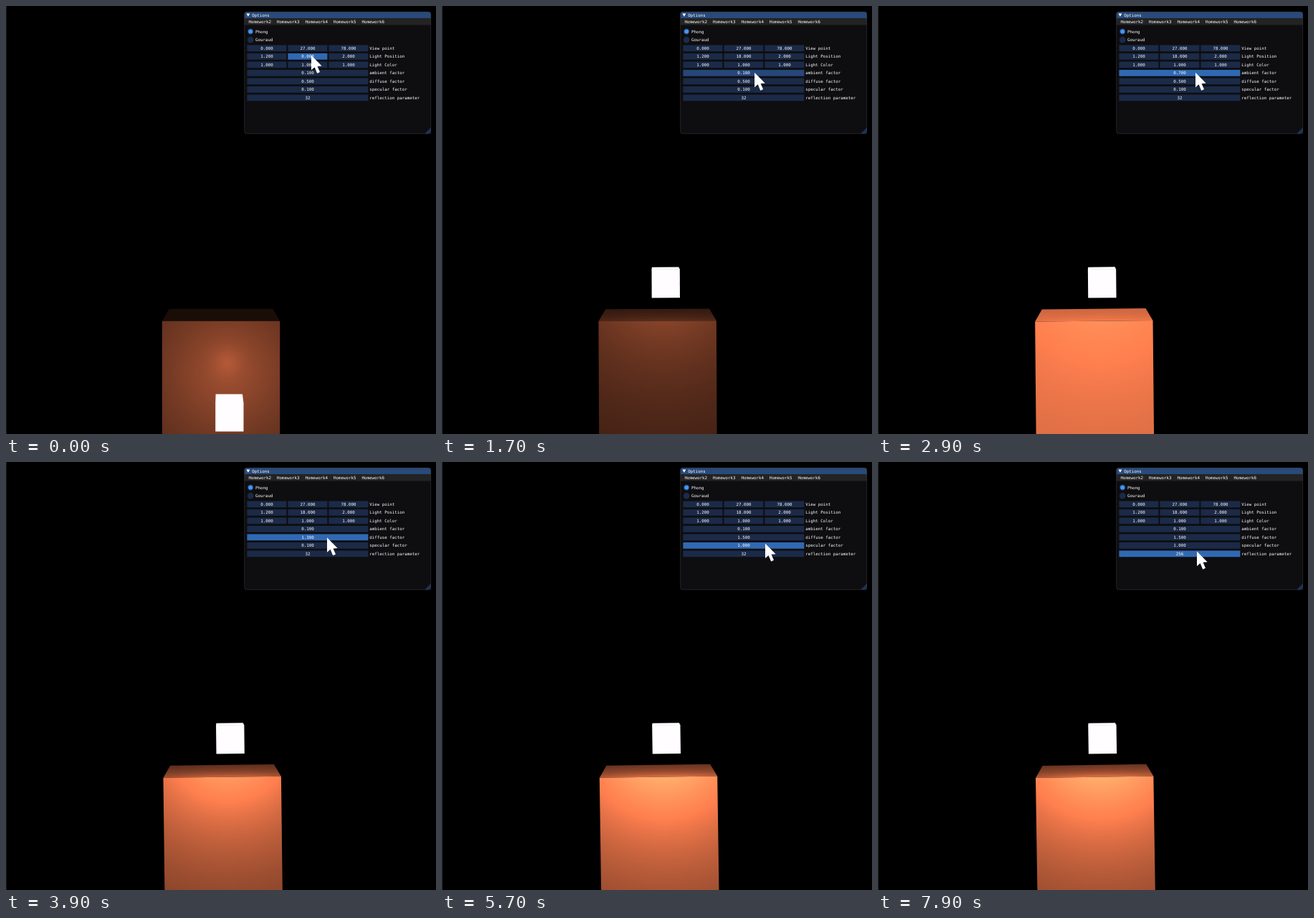
These frames come from a looping animation (600x596 px, 8000 ms). An HTML page with a canvas:

```html
<!DOCTYPE html>
<html lang="en">
<head>
<meta charset="utf-8">
<title>Lighting options</title>
<style>
html, body { margin: 0; width: 100%; height: 100%; overflow: hidden; background: #000; }
canvas { display: block; width: 600px; height: 596px; }
</style>
</head>
<body>
<canvas id="stage" width="600" height="596"></canvas>
<script>
const ctx = document.getElementById('stage').getContext('2d');
const LOOP = 8000, STEP = 100;
const EYE = { x: 300, y: 298, z: 1200 };
const CUBE = { left: 217.8, right: 382.2, top: 438.7, bottom: 606 };
const CORAL = [255, 127, 79];
const LAMP = '#fffdff', IDLE = '#1b2a47', HOVER = '#25477a', ACTIVE = '#3069b3';

const ramp = (t, from, to) => Math.min(1, Math.max(0, (t - from) / (to - from)));

// Everything that changes, as a function of time.
function stateAt(t) {
  const r = (from, to) => ramp(t, from, to);
  return {
    height: Math.round(18 * r(0, 900)),
    ambient: .1 - .1 * r(1900, 2200) + .7 * r(2200, 2600) - .6 * r(3000, 3300),
    diffuse: .5 + .8 * r(3500, 3900) + .2 * r(4000, 4500),
    specular: .1 + .9 * r(4900, 5500),
    shine: Math.round(32 + 224 * r(7100, 7800)),
    roll: .016 * (1 - Math.exp(-Math.max(0, t - 1000) / 2100)),
    cursor: {
      x: 426 + 8 * r(0, 900) + 17 * r(900, 1000) - 17 * r(1000, 1800) + 9 * r(1900, 2600)
        - 4 * r(3000, 3300) + 9 * r(3500, 3900) + 3 * r(4900, 5500)
        - 11 * r(6500, 6900) + 5 * r(7100, 7800),
      y: 68.7 + 15 * r(900, 1000) + 9 * r(1000, 1400) + 12.5 * r(3300, 3600)
        + 8.3 * r(4500, 4900) + 11 * r(6500, 6900)
    }
  };
}

function poly(points, fill) {
  ctx.beginPath();
  points.forEach(([x, y]) => ctx.lineTo(x, y));
  ctx.closePath();
  ctx.fillStyle = fill;
  ctx.fill();
}

function rect(x, y, w, h, fill) {
  ctx.fillStyle = fill;
  ctx.fillRect(x, y, w, h);
}

function disc(x, y, r, fill) {
  ctx.fillStyle = fill;
  ctx.beginPath();
  ctx.arc(x, y, r, 0, 7);
  ctx.fill();
}

function label(text, x, y, align = 'left') {
  ctx.fillStyle = '#fff';
  ctx.textAlign = align;
  ctx.fillText(text, x, y + 2.3);
}

const dot = (a, b) => a.x * b.x + a.y * b.y + a.z * b.z;

function toward(from, to) {
  const v = { x: to.x - from.x, y: to.y - from.y, z: to.z - from.z };
  const len = Math.sqrt(dot(v, v));
  return { x: v.x / len, y: v.y / len, z: v.z / len };
}

// Phong brightness of a surface point.
function phong(point, normal, light, s) {
  const l = toward(point, light);
  const facing = dot(l, normal);
  if (facing <= 0) return s.ambient;
  const v = toward(point, EYE);
  const mirrored = 2 * facing * dot(normal, v) - dot(l, v);
  return s.ambient + s.diffuse * facing + s.specular * Math.max(0, mirrored) ** s.shine;
}

// Surface points behind a screen position.
const frontPoint = (x, y) => ({ x, y, z: 0 });
function lidPoint(x, y) {
  const scale = (y - EYE.y) / (CUBE.top - EYE.y);
  return { x: EYE.x + (x - EYE.x) / scale, y: CUBE.top, z: EYE.z * (1 - 1 / scale) };
}

// Shades a face on a coarse grid and stretches it smoothly over the polygon.
const CELL = 2;
const tile = document.createElement('canvas');
function shadeFace(points, pointAt, normal, light, s) {
  const xs = points.map(p => p[0]), ys = points.map(p => p[1]);
  const x0 = Math.min(...xs) - CELL, y0 = Math.min(...ys) - CELL;
  const w = Math.ceil((Math.max(...xs) - x0) / CELL) + 1;
  const h = Math.ceil((Math.max(...ys) - y0) / CELL) + 1;
  tile.width = w;
  tile.height = h;
  const pen = tile.getContext('2d');
  const image = pen.createImageData(w, h);
  for (let j = 0; j < h; j++) {
    for (let i = 0; i < w; i++) {
      const point = pointAt(x0 + (i + .5) * CELL, y0 + (j + .5) * CELL);
      const glow = phong(point, normal, light, s);
      image.data.set([...CORAL.map(c => c * glow), 255], (j * w + i) * 4);
    }
  }
  pen.putImageData(image, 0, 0);
  ctx.save();
  ctx.beginPath();
  points.forEach(([x, y]) => ctx.lineTo(x, y));
  ctx.clip();
  ctx.drawImage(tile, x0, y0, w * CELL, h * CELL);
  ctx.restore();
}

function faces({ left, right, top, bottom }, depth) {
  const back = x => [x + (EYE.x - x) * depth, top + (EYE.y - top) * depth];
  return {
    front: [[left, top], [right, top], [right, bottom], [left, bottom]],
    lid: [[left, top], back(left), back(right), [right, top]]
  };
}

function drawScene(s) {
  const rise = s.height / 18;
  const light = { x: 309, y: 510 - 125 * rise, z: 85 };
  ctx.save();
  ctx.translate(EYE.x, EYE.y);
  ctx.rotate(-s.roll);
  ctx.translate(-EYE.x, -EYE.y);

  const cube = faces(CUBE, .12);
  shadeFace(cube.lid, lidPoint, { x: 0, y: -1, z: 0 }, light, s);
  shadeFace(cube.front, frontPoint, { x: 0, y: 0, z: 1 }, light, s);

  const top = 553 - 186 * rise;
  const lamp = faces({ left: 292.2, right: 331.5, top, bottom: top + 39.5 }, .049);
  poly(lamp.lid, LAMP);
  rect(292.2, top - .5, 39.3, 40, LAMP);
  ctx.restore();
}

function field(x, y, w, value, fill = IDLE) {
  rect(x, y - 4.1, w, 8.8, fill);
  label(value, x + w / 2, y, 'center');
}

function drawWindow() {
  ctx.save();
  ctx.beginPath();
  ctx.roundRect(332.5, 8, 260.5, 170, 3.5);
  ctx.clip();
  rect(332, 7, 262, 172, '#0e0d10');
  rect(332, 7, 262, 10.2, '#294a7a');
  rect(332, 17.2, 262, 9.2, '#232324');
  poly([[593, 169], [593, 178], [584, 178]], '#1b3358');
  ctx.restore();
  ctx.strokeStyle = '#35353b';
  ctx.lineWidth = .6;
  ctx.beginPath();
  ctx.roundRect(332.7, 8.2, 260, 169.6, 3.5);
  ctx.stroke();

  poly([[335.4, 10.4], [340.4, 10.4], [337.9, 14.8]], '#fff');
  label('Options', 343.3, 12.7);
  for (let i = 0; i < 5; i++) label('Homework' + (i + 2), 338.5 + i * 39.5, 22);

  ['Phong', 'Gouraud'].forEach((name, i) => {
    const y = 35.5 + i * 11.6;
    disc(341.2, y, 4.4, IDLE);
    if (!i) disc(341.2, y, 3.1, '#4296fa');
    label(name, 348, y);
  });
}

function drawSliders(s, t) {
  const look = (hover, grab, drop) => t < hover || t >= drop ? IDLE : t < grab ? HOVER : ACTIVE;
  const rows = [
    ['View point', [0, 27, 78]],
    ['Light Position', [1.2, s.height, 2]],
    ['Light Color', [1, 1, 1]],
    ['ambient factor', [s.ambient], look(1400, 1900, 3400)],
    ['diffuse factor', [s.diffuse], look(3400, 3500, 4800)],
    ['specular factor', [s.specular], look(4800, 4900, 6800)],
    ['reflection parameter', [s.shine], look(6800, 7000, LOOP)]
  ];
  const heightLook = t < 900 ? ACTIVE : look(900, LOOP, 1100);
  rows.forEach(([name, values, fill], i) => {
    const y = 58.5 + i * 11.5;
    const w = values.length > 1 ? 55 : 169;
    values.forEach((v, n) => {
      const text = name.startsWith('reflection') ? String(v) : (Math.round(v * 10) / 10).toFixed(3);
      const dragged = name === 'Light Position' && n === 1;
      field(336.4 + n * 57, y, w, text, dragged ? heightLook : fill);
    });
    label(name, 507.3, y);
  });
}

function drawCursor({ x, y }) {
  const shape = [[0, 0], [0, 20.6], [4.6, 16.5], [8.2, 25], [12, 23.3], [8.5, 15.2], [14.6, 14.8]];
  poly(shape.map(([dx, dy]) => [x + dx, y + dy]), '#fff');
}

function draw(t) {
  const s = stateAt(t);
  ctx.font = '5.82px "DejaVu Sans Mono", "Liberation Mono", monospace';
  ctx.textRendering = 'geometricPrecision';
  rect(0, 0, 600, 596, '#000');
  rect(0, 0, 1, 596, '#1a1a1a');
  drawScene(s);
  drawWindow();
  drawSliders(s, t);
  drawCursor(s.cursor);
}

const start = performance.now();
let shown = -1;
function tick() {
  const t = Math.floor((performance.now() - start) % LOOP / STEP) * STEP;
  if (t !== shown) draw(shown = t);
  requestAnimationFrame(tick);
}
tick();
</script>
</body>
</html>
```
